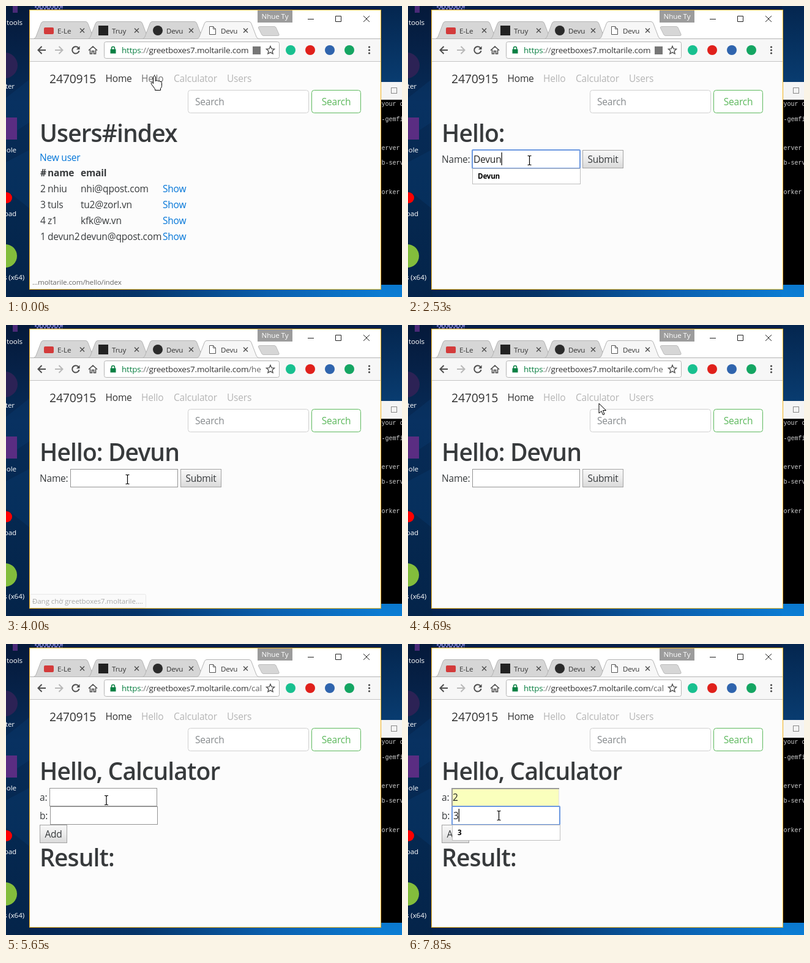
These frames come from a looping animation (647 px wide and 475 px high, 8 s). An HTML page:

```html
<!DOCTYPE html>
<html lang="en">
<head>
<meta charset="utf-8">
<title>Form demo</title>
<style>
html, body { margin: 0; width: 100%; height: 100%; overflow: hidden; background: #04214a; }
svg { display: block; width: 100%; height: 100%; }
text { font-family: "Open Sans", "Noto Sans", sans-serif; white-space: pre; }
.body text { font-size: 15.5px; letter-spacing: -.2px; fill: #373a3c; }
.body .h1 { font-size: 39px; font-weight: 600; letter-spacing: -.9px; }
.body .brand { font-size: 19.4px; fill: #333; }
.body .link { fill: #0275d8; }
.body .nav { fill: #b5b5b5; }
.body .home { fill: #333; }
.body .bold { font-weight: 700; }
.body .hint { font-size: 11.6px; font-weight: 700; fill: #000; }
.body .typed { fill: #222; }
.small { font-size: 11.6px; letter-spacing: -.1px; }
.url { font-size: 13.5px; letter-spacing: -.2px; }
.mono { font: 10px "Liberation Mono", "DejaVu Sans Mono", monospace; fill: #d0d0d0; }
.mid { text-anchor: middle; }
.end { text-anchor: end; }
.line { fill: none; stroke: #4d4d4d; stroke-width: 2; }
.thin { fill: none; stroke: #222; stroke-width: 1; }
</style>
</head>
<body>
<svg id="stage" viewBox="0 0 647 475" preserveAspectRatio="none"></svg>
<script>
const LOOP = 8000;
const HOST = "moltarile";
const SITE = "greetboxes7." + HOST;
const NAME = "Devun";

// ---- markup helpers ----
const text = (x, y, str, cls = "", extra = "") =>
  `<text x="${x}" y="${y}" class="${cls}" ${extra}>${str}</text>`;
const rect = (x, y, w, h, fill, extra = "") =>
  `<rect x="${x}" y="${y}" width="${w}" height="${h}" fill="${fill}" ${extra}/>`;
const dot = (x, y, r, fill, extra = "") =>
  `<circle cx="${x}" cy="${y}" r="${r}" fill="${fill}" ${extra}/>`;
const path = (d, cls, extra = "") => `<path d="${d}" class="${cls}" ${extra}/>`;
const group = (id, inner, extra = "") => `<g id="${id}" ${extra}>${inner}</g>`;
const gradient = (id, vertical, ...colors) =>
  `<linearGradient id="${id}" x2="${vertical ? 0 : 1}" y2="${vertical ? 1 : 0}">` +
  colors.map((c, i) => `<stop offset="${i / (colors.length - 1)}" stop-color="${c}"/>`).join("") +
  `</linearGradient>`;

function desktop() {
  const label = (x, y, str) => text(x, y, str, "small end", 'fill="#fff"');
  const consoleLines = [[163, "your c"], [188, "-gemfi"], [235, "erver p"], [259, "b-serv"], [307, "orker"]];
  return rect(0, 0, 647, 475, "url(#floor)") +
    rect(0, 0, 647, 7, "#04204a") +
    rect(0, 0, 40, 475, "url(#leftSky)") +
    rect(611, 0, 36, 475, "url(#rightSky)") +
    path("M0 150L38 120V190L0 215ZM0 255L38 235V330L0 300Z", "", 'fill="#0a3c74" opacity=".35"') +
    rect(11, 0, 8, 11, "#4a2a78") +
    path("M47 1.5H95M50 4.5H92", "", 'stroke="#8f8be0" stroke-width="2" stroke-dasharray="3 2 5 2" fill="none"') +
    dot(-2, 97, 21, "#2c2255") + rect(-18, 182, 36, 36, "#5a2d82") +
    dot(1, 313, 9, "#f00") + dot(-1, 408, 19, "#83bd3c") +
    label(27, 31, "tools") + label(14, 135, "ter") + label(17, 239, "hole") +
    label(17, 343, "pad") + label(30, 447, "s (x64)") +
    rect(613, 124, 34, 331, "#000") + rect(613, 124, 34, 29, "#f4f4f4") +
    rect(629.5, 133.5, 9, 9, "none", 'stroke="#888"') +
    consoleLines.map(([y, s]) => text(613.5, y, s, "mono")).join("");
}

function tab(i, title, icon, active) {
  const x = 45 + 89 * i;
  const shape = `M${x} 53.5Q${x + 3} 53 ${x + 4} 50L${x + 12} 29Q${x + 13} 25.5 ${x + 16} 25.5` +
    `H${x + 85}Q${x + 88} 25.5 ${x + 89} 29L${x + 97} 50Q${x + 98} 53 ${x + 101} 53.5`;
  return path(shape, "", `fill="${active ? "#f7f7f7" : "#d6d6d6"}" stroke="#b4b4b4"`) + icon +
    text(x + 39, 44.5, title, "small", `fill="#333" clip-path="url(#tab${i})" ${active ? 'id="title"' : ""}`) +
    path(`M${x + 76} 36.5l7 7m0 -7l-7 7`, "line", 'style="stroke-width:1.4"');
}

function chrome() {
  const pageIcon = path("M332.5 33.5H338.5L342.5 37.5V46.5H332.5ZM338.5 33.5V37.5H342.5", "", 'id="pageIcon" fill="#fff" stroke="#555"');
  const spinner = path("M337 34.5A5.5 5.5 0 1 1 331.5 40", "line", 'id="spinner" style="stroke:#777"');
  const extensions = ["#18c08f", "#e0201b", "#2f64ad", "#14a562"];
  return rect(38, 6, 575, 457, "#fff") +
    rect(411, 7, 57, 20, "#9c9c9c") +
    text(439.5, 21, "Nhue Ty", "small mid", 'fill="#fff"') +
    path("M493 21.5H503M538.5 16.5H547.5V25.5H538.5ZM584 16l10 10m0 -10l-10 10", "thin") +
    tab(0, "E-Le", rect(62, 35, 16, 11, "#d33b3b", 'rx="2"')) +
    tab(1, "Truy", rect(151, 32, 16, 16, "#222")) +
    tab(2, "Devu", dot(248, 40, 8, "#2b2b2b")) +
    rect(39, 53, 573, 37, "#f7f7f7") +
    path("M39 53.5H612", "", 'stroke="#b4b4b4"') +
    tab(3, "Devu", pageIcon + spinner, true) +
    path("M415 33.5H438Q440 33.5 441 35L446 46Q447 48.5 444 48.5H421Q419 48.5 418 47L412.5 36Q411.5 33.5 415 33.5Z", "", 'fill="#d6d6d6" stroke="#bdbdbd"') +
    path("M39 90.5H612", "", 'stroke="#c4c4c4"') +
    path("M65 72H53M58.5 66L52.5 72L58.5 78", "line") +
    path("M80 72H92M86.5 66L92.5 72L86.5 78", "line", 'style="stroke:#b8b8b8"') +
    group("reload", path("M118.5 68.5A5.7 5.7 0 1 0 119.5 73", "line") + path("M120.5 65.5V71H115Z", "", 'fill="#4d4d4d"')) +
    path("M109 67l10 10m0 -10l-10 10", "line", 'id="stop"') +
    path("M135 72.5L142 66L149 72.5M137.5 71.5V78H140.5V73.5H143.5V78H146.5V71.5", "line", 'style="stroke-width:1.6"') +
    rect(160.5, 58.5, 286, 27, "#fff", 'rx="3" stroke="#b5b5b5"') +
    rect(170.5, 70.5, 9, 7, "#0b8043") +
    path("M172.5 71V69Q172.5 66.5 175 66.5T177.5 69V71", "line", 'style="stroke:#0b8043;stroke-width:1.5"') +
    `<text x="189" y="77" class="url" fill="#333" clip-path="url(#urlClip)"><tspan fill="#0b8043">https</tspan>` +
    `<tspan fill="#777">://</tspan>${SITE}.com<tspan id="route" fill="#666"></tspan></text>` +
    rect(403, 66, 13, 13, "#777", 'id="badge"') +
    path("M432 65.5L433.9 69.9L438.6 70.3L435 73.4L436.1 78L432 75.6L427.9 78L429 73.4L425.4 70.3L430.1 69.9Z", "line", 'style="stroke-width:1.3"') +
    extensions.map((c, i) => dot(465 + 32 * i, 72, 8, c, i ? "" : 'id="ext"')).join("") +
    [67, 72, 77].map(y => dot(593.5, y, 1.6, "#444")).join("");
}

const button = (x, y, w, str) =>
  rect(x + .5, y + .5, w - 1, 29, "url(#btn)", 'stroke="#a3a3a3"') +
  text(x + w / 2, y + 21, str, "mid");

// A text field with three looks: idle outline, focus ring, inset bevel once filled in.
const field = (id, x, y) =>
  rect(x + .5, y + .5, 175, 29, "#fff", `id="${id}Box" stroke="#949494"`) +
  path(`M${x + 1} ${y + 30}V${y + 1}H${x + 176}`, "", `id="${id}Bevel" fill="none" stroke="#9a9a9a" stroke-width="2"`) +
  rect(x, y, 176, 30, "none", `id="${id}Ring" rx="1" stroke="#6c98e0" stroke-width="2"`) +
  text(x + 2, y + 21, "", "typed", `id="${id}Text"`) +
  rect(0, y + 4, 1.2, 21, "#000", `id="${id}Caret"`);

const popup = (id, x, y, str) => group(id + "Popup",
  rect(x + .5, y + .5, 176, 25, "#fff", 'stroke="#bfbfbf"') + text(x + 9, y + 17, str, "hint"));

function usersPage() {
  const rows = [
    ["2", "nhiu", "nhi@qpost.com"],
    ["3", "tuls", "tu2@zorl.vn"],
    ["4", "z1", "kfk@w.vn"],
    ["1", "devun2", "devun@qpost.com"]
  ];
  const row = (cells, y, cls) => cells.map((c, i) => text([56, 68, 122][i], y, c, cls)).join("");
  return text(55, 222, "Users#index", "h1") + text(55, 253, "New user", "link") +
    row(["#", "name", "email"], 278, "bold") +
    rows.map((r, i) => row(r, 304 + 26 * i, "") + text(256, 304 + 26 * i, "Show", "link")).join("");
}

function page() {
  return rect(39, 91, 573, 371, "#fcfcfc") +
    text(71, 126, "2470915", "brand") +
    text(162.5, 124, "Home", "nav home") + text(221, 124, "Hello", "nav", 'id="navHello"') +
    text(274, 124, "Calculator", "nav", 'id="navCalc"') + text(361, 124, "Users", "nav") +
    rect(297.5, 137.5, 197, 37, "#fff", 'rx="4" stroke="#cfcfcf"') +
    text(309, 162, "Search", "", 'style="fill:#85898c"') +
    rect(499.5, 137.5, 80, 37, "#fff", 'rx="4" stroke="#5cb85c"') +
    text(539.5, 162, "Search", "mid", 'style="fill:#5cb85c"') +
    group("users", usersPage()) +
    group("hello", text(55, 222, "Hello:", "h1", 'id="greeting"') + text(55, 256, "Name:") +
      field("name", 105, 235) + button(285, 235, 67, "Submit") + popup("name", 105, 265, NAME)) +
    group("calc", text(55, 222, "Hello, Calculator", "h1") + text(55, 256, "a:") + text(55, 286, "b:") +
      button(55, 295, 45, "Add") + field("a", 71, 235) + field("b", 72, 265) +
      text(55, 363, "Result:", "h1") + popup("a", 70, 265, "2") + popup("b", 72, 295, "3"));
}

const cursors =
  path("M-2 1Q0 -2 2 1V8Q4 6 6 8Q8 7 9 9Q12 8 12 11V16Q12 18 10 20V23H1V21L-5 13Q-6 10 -4 10L-2 12Z", "", 'id="hand" fill="#fff" stroke="#000"') +
  path("M0 0V16L4 12.5L6.5 18.5L9 17.5L6.5 11.5H11.5Z", "", 'id="arrow" fill="#fff" stroke="#000"') +
  path("M-3 -7.5H-1L0 -6.5L1 -7.5H3M0 -6.5V6.5M-3 7.5H-1L0 6.5L1 7.5H3", "thin", 'id="beam" style="stroke:#000;stroke-width:1.2"');

const clip = (id, x, y, w, h) => `<clipPath id="${id}">${rect(x, y, w, h, "#000")}</clipPath>`;

document.getElementById("stage").innerHTML =
  "<defs>" + gradient("floor", false, "#03204a", "#053468", "#0a5fae", "#0b80d8") +
  gradient("leftSky", true, "#05193a", "#072b57", "#052850", "#04244a") +
  gradient("rightSky", true, "#04264f", "#0a4279", "#0a5ca6", "#0b7dd4") +
  gradient("btn", true, "#f8f8f8", "#ececec", "#d9d9d9") +
  [0, 1, 2].map(i => clip("tab" + i, 84 + 89 * i, 30, 27, 20)).join("") +
  clip("tab3", 351, 30, 28, 20) + clip("urlClip", 185, 60, 233, 24) + "</defs>" +
  desktop() + chrome() + group("page", page(), 'class="body"') +
  group("status", rect(39.5, 439.5, 189, 22, "#fafafa", 'id="statusBox" rx="2" stroke="#d8d8d8"') +
    text(43, 455, "", "small", 'id="statusText" fill="#666"')) +
  rect(38.5, 6.5, 574, 456, "none", 'stroke="#f2b21b"') +
  group("cursor", cursors);

// ---- timeline ----
const el = {};
document.querySelectorAll("[id]").forEach(n => el[n.id] = n);

const at = (rows, t) => rows.findLast(r => r[0] <= t);
const between = (t, ...spans) => spans.some(([a, b]) => t >= a && t < b);
const show = (id, on) => el[id].style.display = on ? "" : "none";
const write = (id, str) => { if (el[id].textContent !== str) el[id].textContent = str; };

const pointer = [
  [0, 242.5, 114.5, "hand"], [180, 242.5, 114.5, "arrow"], [280, 242.5, 114.5, "hand"],
  [640, 206, 164, "arrow"], [730, 198.5, 252, "beam"],
  [4240, 204, 247, "beam"], [4330, 222, 232, "beam"], [4420, 246, 209, "beam"],
  [4510, 270, 183, "arrow"], [4600, 294, 152, "arrow"], [4690, 312, 128, "arrow"],
  [4780, 318, 115, "hand"],
  [5130, 300, 140, "arrow"], [5220, 272, 164, "arrow"], [5300, 239.5, 217, "beam"],
  [5390, 205, 238, "beam"], [5480, 175, 250, "beam"], [5560, 164, 255, "beam"],
  [6730, 164, 268, "arrow"], [7180, 158, 272, "beam"], [7270, 148.5, 280, "beam"]
];
const status = [
  [0, 1, "hello"], [890, .66, "hello"], [970, .33, "hello"], [1060, 0, ""],
  [2890, 1, "wait"], [4000, .55, "wait"], [4100, 0, ""],
  [4870, .6, "calc"], [4960, 1, "calc"], [5560, .5, "calc"], [5650, 0, ""]
];
const typing = [[0, 0], [1930, 1], [2110, 2], [2260, 3], [2440, 4], [2530, 5], [3660, 0]];

function setField(id, value, focus, caret, filled = false) {
  write(id + "Text", value);
  const bevel = filled && !focus;
  el[id + "Box"].setAttribute("fill", filled ? "#faffbd" : "#fff");
  el[id + "Box"].setAttribute("stroke", bevel ? "#e4e4e4" : "#949494");
  show(id + "Bevel", bevel);
  show(id + "Ring", focus);
  show(id + "Caret", caret);
  if (caret) {
    const width = value ? el[id + "Text"].getComputedTextLength() : 0;
    el[id + "Caret"].setAttribute("x", +el[id + "Text"].getAttribute("x") + width);
  }
}

function update(t) {
  const loading = between(t, [2800, 3660]);
  const greeted = t >= 3660;

  show("users", t < 180);
  show("hello", between(t, [180, 5480]));
  show("calc", t >= 5480);
  write("greeting", greeted ? "Hello: " + NAME : "Hello:");
  el.navHello.style.fill = between(t, [0, 180], [280, 640]) ? "#757575" : "";
  el.navCalc.style.fill = between(t, [4780, 5480]) ? "#757575" : "";

  write("title", greeted ? NAME : NAME.slice(0, 4));
  write("route", t < 3390 ? "" : t < 5220 ? "/he" : "/cal");
  show("badge", t < 3390);
  show("pageIcon", !loading);
  show("spinner", loading);
  show("reload", !loading);
  show("stop", loading);
  el.spinner.setAttribute("transform", `rotate(${-Math.floor((t - 2800) / 86) * 45} 337 40)`);
  el.ext.setAttribute("fill", between(t, [3390, 3570]) ? "#b5b5b5" : "#18c08f");

  setField("name", NAME.slice(0, at(typing, t)[1]), between(t, [890, 3660]),
    between(t, [890, 1500], [1930, 3060]));
  setField("a", t >= 6640 ? "2" : "", between(t, [5830, 7180]),
    between(t, [5830, 6360], [6640, 7180]), t >= 6940);
  setField("b", t >= 7850 ? "3" : "", t >= 7270, t >= 7270);
  show("namePopup", between(t, [2020, 2800]));
  show("aPopup", between(t, [6730, 6940]));
  show("bPopup", t >= 7850);

  const [, alpha, kind] = at(status, t);
  el.status.setAttribute("opacity", alpha);
  show("statusBox", kind !== "hello");
  write("statusText", kind === "wait" ? `Đang chờ ${SITE}....` : kind ? `...${HOST}.com/${kind}/index` : "");

  const [, x, y, shape] = at(pointer, t);
  el.cursor.setAttribute("transform", `translate(${x} ${y})`);
  ["hand", "arrow", "beam"].forEach(s => show(s, s === shape));
}

const start = performance.now();
function frame(now) {
  update(Math.max(0, now - start) % LOOP);
  requestAnimationFrame(frame);
}
update(0);
requestAnimationFrame(frame);
</script>
</body>
</html>
```
